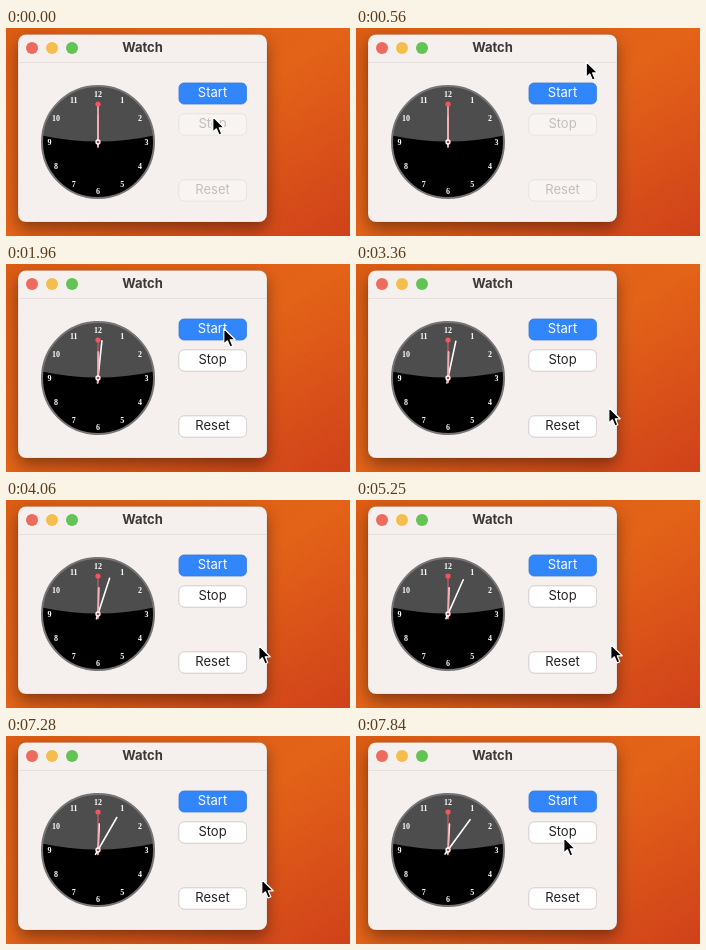
An HTML page for the animation above (8000 ms loop, 344 by 208 pixels).

```html
<!DOCTYPE html>
<html lang="en">
<head>
<meta charset="utf-8">
<title>Watch</title>
<style>
  html, body { margin: 0; width: 100%; height: 100%; overflow: hidden; }
  svg { display: block; width: 344px; height: 208px; }
  text { font: 13px Inter, sans-serif; text-anchor: middle; }
  .title { font-weight: 700; fill: #3c3837; }
  .numerals text { font: bold 8px "Liberation Serif", serif; fill: #fff; }
  .button rect { fill: #fff; stroke: #d5cfcc; stroke-width: .6; filter: drop-shadow(0 .6px .5px #0004); }
  .button text { fill: #252322; }
  .button.disabled rect { fill: #f8f4f2; stroke: #e5dfdc; filter: drop-shadow(0 .5px .4px #0001); }
  .button.disabled text { fill: #c4bebb; }
  #start rect { fill: #3186fb; stroke: #2b7bed; }
  #start text { fill: #fff; }
  #start.pressed rect { fill: #2b79e9; }
</style>
</head>
<body>
<svg viewBox="0 0 344 208">
  <defs>
    <linearGradient id="wall" x1="0" y1="0" x2="1" y2="1">
      <stop offset="0" stop-color="#dc5c13"/>
      <stop offset=".5" stop-color="#e36318"/>
      <stop offset="1" stop-color="#d0411a"/>
    </linearGradient>
    <filter id="shadow" x="-20%" y="-20%" width="140%" height="150%">
      <feDropShadow dx="0" dy="7" stdDeviation="8" flood-opacity=".4"/>
    </filter>
    <clipPath id="face"><circle cx="92" cy="114" r="56"/></clipPath>
  </defs>
  <rect width="344" height="208" fill="url(#wall)"/>
  <rect x="12" y="6.5" width="249" height="187.5" rx="8" fill="#f5efed" stroke="#0003" stroke-width=".5" filter="url(#shadow)"/>
  <path d="M12 34.5H261" stroke="#e3dbd8" stroke-width=".8"/>
  <circle cx="26" cy="20" r="6" fill="#ed6a5e"/>
  <circle cx="46" cy="20" r="6" fill="#f4be4f"/>
  <circle cx="66" cy="20" r="6" fill="#61c454"/>
  <text class="title" x="136.5" y="24">Watch</text>

  <circle cx="92" cy="114" r="56" fill="#000"/>
  <path d="M30 50H154V106Q92 121 30 106Z" fill="#4d4d4d" clip-path="url(#face)"/>
  <circle cx="92" cy="114" r="56" fill="none" stroke="#767474" stroke-width="2"/>
  <g class="numerals" id="numerals"></g>
  <g transform="translate(92 114)" stroke-linecap="round">
    <path id="hour" d="M0 4V-26" stroke="#fff" stroke-width="1.8"/>
    <path id="minute" d="M0 5V-37.5" stroke="#fff" stroke-width="1.6"/>
    <path d="M0 5V-38" stroke="#ee6268" stroke-width="1"/>
    <circle cy="-38" r="2.6" fill="#f2555d"/>
    <circle r="2" fill="#b5524d" stroke="#fff" stroke-width="1.3"/>
  </g>

  <g id="buttons"></g>
  <path id="cursor" d="M.8 1.5V17.2L4.4 13.8 7 20 9.8 18.8 7.2 12.8H12.2Z" fill="#000" stroke="#fff" stroke-width="1.2" stroke-linejoin="round"/>
</svg>
<script>
const LOOP = 8000;
const ticks = [1820, 2940, 4060, 5250, 6230, 7350];
// time, x, y
const cursorPath = [
  [0, 206, 87], [140, 206, 87], [520, 230, 31], [840, 217, 56], [980, 217, 56],
  [1120, 217, 63], [2800, 217, 63], [3360, 252, 142], [3570, 252, 142],
  [3820, 257, 144], [4060, 252, 144], [4130, 252, 144], [4340, 254, 143],
  [5670, 254, 143], [5880, 255, 142], [7280, 255, 142], [7840, 207, 100], [LOOP, 207, 100]
];
const $ = id => document.getElementById(id);

for (let n = 1; n <= 12; n++) {
  const angle = n * Math.PI / 6;
  const x = 92 + 48.5 * Math.sin(angle), y = 117 - 48.5 * Math.cos(angle);
  $('numerals').innerHTML += `<text x="${x}" y="${y}">${n}</text>`;
}
for (const [label, y] of [['Start', 55], ['Stop', 86], ['Reset', 152]]) {
  $('buttons').innerHTML += `<g class="button" id="${label.toLowerCase()}">
    <rect x="173" y="${y}" width="67.5" height="21" rx="5"/>
    <text x="206.5" y="${y + 14.2}">${label}</text></g>`;
}

function cursorAt(t) {
  const i = cursorPath.findIndex(point => point[0] > t);
  const [t0, x0, y0] = cursorPath[i - 1], [t1, x1, y1] = cursorPath[i];
  const p = (t - t0) / (t1 - t0), ease = p * p * (3 - 2 * p);
  return [x0 + (x1 - x0) * ease, y0 + (y1 - y0) * ease];
}

function draw(now) {
  const t = now % LOOP;
  const count = ticks.filter(tick => tick <= t).length;
  $('minute').setAttribute('transform', `rotate(${count * 6})`);
  $('hour').setAttribute('transform', `rotate(${count / 2})`);
  $('start').classList.toggle('pressed', t >= 840 && t < 1120);
  $('stop').classList.toggle('disabled', t < 840);
  $('reset').classList.toggle('disabled', t < ticks[0]);
  $('cursor').setAttribute('transform', `translate(${cursorAt(t)})`);
}

const begin = performance.now();
function frame() {
  draw(performance.now() - begin);
  requestAnimationFrame(frame);
}
frame();
</script>
</body>
</html>
```
